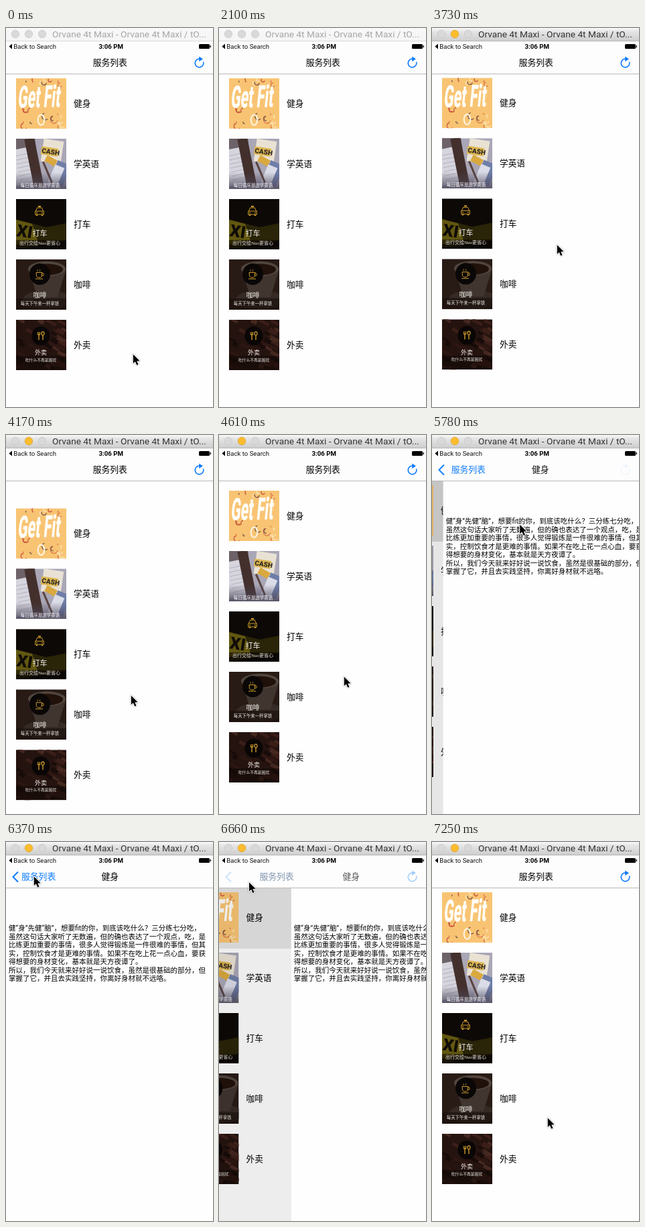
Write an HTML page with a canvas that moves like this. It is 309x565 px and loops after 8000 ms.

```html
<!DOCTYPE html>
<html lang="zh">
<head>
<meta charset="utf-8">
<style>
html, body { margin: 0; width: 100%; height: 100%; overflow: hidden; background: #fff; }
canvas { display: block; width: 309px; height: 565px; }
</style>
</head>
<body>
<canvas id="stage"></canvas>
<script>
const W = 309, H = 565, LOOP = 8000, ROW = 90, PIC = 75;
const BLUE = '#0a7aff', GOLD = '#c99a2c', PAPER = '#fefefe';
const CJK = "Roboto, 'Noto Sans CJK SC', 'Noto Sans CJK', sans-serif";
const SERIF = "'Liberation Serif', 'Noto Sans CJK SC', 'Noto Sans CJK', serif";
const cv = document.getElementById('stage'), c = cv.getContext('2d');
const dpr = window.devicePixelRatio || 1;
cv.width = W * dpr;
cv.height = H * dpr;

// ---- motion ----
const progress = (t, a, b) => Math.min(1, Math.max(0, (t - a) / (b - a)));
const smooth = (t, a, b) => { const u = progress(t, a, b); return u * u * (3 - 2 * u); };
const easeOut = (t, a, b) => 1 - Math.pow(1 - progress(t, a, b), 3);

// Places the pointer rests or turns: time, x, y
const stops = [
  [1050, 189, 486], [1350, 172, 421], [1950, 242, 541], [2850, 224, 488],
  [3730, 186, 323], [4170, 186, 388], [4610, 186, 360], [5200, 140, 142],
  [5640, 140, 142], [6370, 41, 51], [6600, 41, 51], [7250, 172, 411]
];

function pointer(t) {
  let [, x, y] = stops[0];
  for (let i = 1; i < stops.length; i++) {
    const [t0, x0, y0] = stops[i - 1], [t1, x1, y1] = stops[i];
    const u = smooth(t, t0, t1);
    x += (x1 - x0) * u;
    y += (y1 - y0) * u;
  }
  return [x, y];
}

// Dragged down, then springs back; snaps to thirds of a point.
function pullAt(t) {
  if (t < 3500) return 0;
  const drag = 35 * smooth(t, 3730, 4170) - 0.6;
  const spring = 8 * Math.exp((4610 - t) / 262);
  return Math.round(Math.min(drag, spring) * 3) / 3;
}

function sampled(t) {
  if (t < 3137) return Math.min(2850, Math.floor(t / 150) * 150);
  const k = Math.min(28, Math.floor((t - 3137) / 146.79));
  return Math.round(314 + k * 14.679) * 10;
}

// ---- drawing helpers ----
function seeded(seed) {
  return (lo, hi) => {
    seed = (seed * 16807) % 2147483647;
    return lo + (hi - lo) * seed / 2147483647;
  };
}

function rect(x, y, w, h, fill) {
  c.fillStyle = fill;
  c.fillRect(x, y, w, h);
}

function at(x, y, turn, paint) {
  c.save();
  c.translate(x, y);
  c.rotate(turn);
  paint();
  c.restore();
}

// Rectangle around a centre, turned.
const slab = (x, y, w, h, turn, fill) => at(x, y, turn, () => rect(-w / 2, -h / 2, w, h, fill));

function oval(x, y, rx, ry, fill, stroke, lw = 1) {
  c.beginPath();
  c.ellipse(x, y, rx, ry, 0, 0, Math.PI * 2);
  if (fill) { c.fillStyle = fill; c.fill(); }
  if (stroke) { c.strokeStyle = stroke; c.lineWidth = lw; c.stroke(); }
}

function trace(pts) {
  c.beginPath();
  for (let i = 0; i < pts.length; i += 2) c.lineTo(pts[i], pts[i + 1]);
}

function poly(pts, fill) {
  trace(pts);
  c.closePath();
  c.fillStyle = fill;
  c.fill();
}

function line(pts, stroke, lw = 1) {
  trace(pts);
  c.strokeStyle = stroke;
  c.lineWidth = lw;
  c.stroke();
}

function text(s, x, y, font, fill, align = 'left') {
  c.font = font;
  c.fillStyle = fill;
  c.textAlign = align;
  c.fillText(s, x, y);
}

// ---- thumbnails ----
function fitness() {
  const rnd = seeded(41), inks = ['#c8553c', '#d9774a', '#7d5b4e', '#fbe3b4'];
  rect(0, 0, PIC, PIC, '#f8c473');
  for (let i = 0; i < 22; i++) {
    const y = i % 3 ? rnd(45, 73) : rnd(2, 10);
    c.beginPath();
    c.arc(rnd(2, 73), y, rnd(2, 6), rnd(0, 3), rnd(3, 5));
    c.strokeStyle = inks[i % 4];
    c.lineWidth = 1.4;
    c.stroke();
  }
  oval(37.5, 62, 4.8, 7.8, null, '#fff6e4', 2);
  c.save();
  c.transform(0.46, -0.01, -0.1, 1, 2, 44);
  text('Get Fit', 0, 0, '900 46px Roboto, sans-serif', '#fffdf8');
  c.restore();
}

function english() {
  rect(0, 0, PIC, PIC, '#a9a6b6');
  slab(12, 8, 34, 22, -0.1, '#6d6268');
  slab(8, 42, 26, 54, -0.2, '#d6d5de');
  for (let i = 0; i < 7; i++) slab(8 + i, 24 + i * 6, 18, 0.8, -0.2, '#aaa8b4');
  slab(27, 36, 15, 74, -0.2, '#43302d');
  slab(54, 19, 30, 34, 0.15, '#e9e2d4');
  slab(52, 33, 17, 10, 0.5, '#d9a83e');
  slab(50, 19, 25, 12, 0.15, '#dcb653');
  slab(66, 52, 22, 34, 0.4, '#6f7ea8');
  slab(60, 54, 15, 28, 0.4, '#dadce8');
  slab(47, 50, 3, 34, -0.4, '#5b4440');
  at(38, 21, 0.15, () => text('CASH', 0, 0, '900 10px Roboto, sans-serif', '#2c2722'));
  const g = c.createLinearGradient(0, 50, 0, PIC);
  g.addColorStop(0, 'rgba(75,70,88,0)');
  g.addColorStop(1, 'rgba(75,70,88,.85)');
  rect(0, 50, PIC, 25, g);
  text('每日循序渐进学英语', 36, 71.6, '6.5px ' + CJK, '#fff', 'center');
}

function titles(name, size, y, sub, subFont, subY, x = 35.5) {
  text(name, x, y, `500 ${size}px ${CJK}`, '#f3efeb', 'center');
  text(sub, x, subY, subFont, '#efebe6', 'center');
}

function taxi() {
  rect(0, 0, PIC, PIC, '#0d0906');
  poly([0, 30, 45, 42, 75, 36, 75, 62, 0, 75], '#2a2408');
  poly([0, 31, 24, 37, 32, 62, 0, 68], '#625710');
  at(-31, 50, 0.16, () => text('TAXI', 0, 0, '900 25px Roboto, sans-serif', '#100c07'));
  rect(0, 61, PIC, 14, 'rgba(8,5,3,.55)');
  at(35, 18, 0, () => {
    line([-5.5, 0, -3.5, -5, 3.5, -5, 5.5, 0], GOLD, 1);
    c.strokeRect(-6.3, 0, 12.6, 5);
    rect(-2, -8, 4, 2, GOLD);
    for (const s of [-4, 4]) {
      oval(s, 2.5, 0.9, 0.9, GOLD);
      rect(s - 1.2, 5, 2.4, 2, GOLD);
    }
  });
  titles('打车', 11, 55, '出行交给Nuo更省心', '500 7px ' + SERIF, 68);
}

function coffee() {
  rect(0, 0, PIC, PIC, '#281b16');
  oval(46, 60, 36, 14, '#352a24');
  poly([18, 14, 75, 14, 62, 56, 32, 56], '#40352f');
  oval(46, 14, 28, 11, '#51463e');
  oval(46, 15, 24, 8.5, '#21110b');
  rect(0, 58, PIC, 17, 'rgba(24,14,10,.6)');
  oval(35.5, 22, 15.5, 16, '#0a0706');
  at(34.5, 22, 0, () => {
    line([-4.5, -2.5, -4, 3, -2, 5, 2, 5, 4, 3, 4.5, -2.5, -4.5, -2.5], GOLD);
    oval(5.3, 0.5, 1.7, 1.9, null, GOLD, 0.9);
    line([-5.5, 7, 5.5, 7], GOLD);
    for (const s of [-2, 1.5]) line([s, -4, s - 0.8, -5.5, s, -7], GOLD, 0.8);
  });
  titles('咖啡', 10, 56.8, '每天下午来一杯拿铁', '500 6.4px ' + CJK, 68);
}

function takeout() {
  const rnd = seeded(7), tones = ['#3b1e18', '#180c0a', '#452820', '#2e1712'];
  rect(0, 0, PIC, PIC, '#24130f');
  for (let i = 0; i < 40; i++) slab(rnd(0, 75), rnd(0, 75), rnd(8, 20), rnd(3, 7), 0.5, tones[i % 4]);
  rect(0, 54, PIC, 21, 'rgba(18,9,7,.55)');
  oval(37, 24, 13.5, 14, '#0a0605');
  at(37, 24, 0, () => {
    line([-3, -2, -3, 6], GOLD, 1.4);
    for (let i = -1; i < 2; i++) line([i * 1.7 - 3, -6, i * 1.7 - 3, -2], GOLD, 0.9);
    line([-5, -2, -1, -2], GOLD, 1.4);
    oval(3, -3.5, 2, 2.6, null, GOLD, 1.3);
    line([3, -1, 3, 6], GOLD, 1.4);
  });
  titles('外卖', 9, 52.4, '吃什么不再是困扰', '500 5.8px ' + CJK, 62, 37);
}

const rows = [['健身', fitness], ['学英语', english], ['打车', taxi], ['咖啡', coffee], ['外卖', takeout]];
const article = [
  '健“身”先健“脑”，想要fit的你，到底该吃什么？三分练七分吃，',
  '虽然这句话大家听了无数遍，但的确也表达了一个观点，吃，是',
  '比练更加重要的事情，很多人觉得锻炼是一件很难的事情，但其',
  '实，控制饮食才是更难的事情。如果不在吃上花一点心血，要获',
  '得想要的身材变化，基本就是天方夜谭了。',
  '所以，我们今天就来好好说一说饮食，虽然是很基础的部分，但',
  '掌握了它，并且去实践坚持，你离好身材就不远咯。'
];

// ---- screens ----
function list(pull, lit) {
  const shift = Math.round(pull);
  rect(0, 69, W, H - 69, PAPER);
  if (lit) rect(0, 69, W, ROW, `rgba(217,217,217,${lit})`);
  rows.forEach(([name, art], i) => {
    const y = 75 + ROW * i;
    at(15, y + pull, 0, () => {
      c.beginPath();
      c.rect(0, 0, PIC, PIC);
      c.clip();
      art();
    });
    text(name, 101, y + shift + 42.4, '12.7px ' + CJK, '#000');
    if (shift === 1) rect(101, y + 84, W - 101, 1, '#dedede');
  });
}

function detail() {
  rect(0, 69, W, H - 69, PAPER);
  article.forEach((s, i) => text(s, 4, 132.4 + i * 12.5, '10.5px ' + CJK, '#000'));
}

function navBar(p, pressed) {
  const title = '500 12.8px ' + CJK;
  rect(0, 35, W, 33, '#fdfdfd');
  rect(0, 68, W, 1, '#b9b9b9');
  c.globalAlpha = 1 - p;
  text('服务列表', 155.3 - 106 * p, 56.1, title, '#000', 'center');
  c.beginPath();
  c.arc(288.6, 52.3, 6.3, -0.3, Math.PI * 1.55);
  c.strokeStyle = BLUE;
  c.lineWidth = 1.6;
  c.stroke();
  poly([288.2, 42.5, 294, 46.3, 288.2, 50], BLUE);
  c.globalAlpha = p * (pressed ? 0.3 : 1);
  line([18, 44.5, 10.5, 52, 18, 59.5], BLUE, 2);
  text('服务列表', 23 + 106 * (1 - p), 56.1, '12.8px ' + CJK, BLUE);
  c.globalAlpha = p;
  text('健身', 155.3 + 120 * (1 - p), 56.1, title, '#000', 'center');
  c.globalAlpha = 1;
}

function statusBar() {
  rect(0, 20, W, 15, '#fdfdfd');
  poly([4.5, 27.5, 9, 23.5, 9, 31.5], '#000');
  text('Back to Search', 11.3, 30.9, '9.6px Roboto, sans-serif', '#111');
  text('3:06 PM', 156.7, 31, 'bold 9.7px Roboto, sans-serif', '#000', 'center');
  c.beginPath();
  c.roundRect(288, 24, 16, 7, 1.5);
  c.fillStyle = '#000';
  c.fill();
  rect(304.7, 26, 1.3, 3, '#000');
}

function windowBar(active) {
  const g = c.createLinearGradient(0, 0, 0, 19);
  g.addColorStop(0, '#fafafa');
  g.addColorStop(0.25, active ? '#e6e6e6' : '#f7f7f7');
  g.addColorStop(1, active ? '#cecece' : '#f5f5f5');
  rect(0, 0, W, 19, g);
  rect(0, 19, W, 1, active ? '#b8b8b8' : '#dadada');
  for (let i = 0; i < 3; i++) {
    const gold = active && i === 1;
    oval(14 + i * 20, 9, 5.7, 5.7, gold ? '#fdbd2e' : '#d9d9d9', gold ? '#dfa023' : '#c8c8c8', 0.8);
  }
  text('Orvane 4t Maxi - Orvane 4t Maxi / tO...', 69, 14, '13.7px Roboto, sans-serif',
    active ? '#333' : '#a6a6a6');
}

function cursor([x, y]) {
  at(x, y, 0, () => {
    trace([0.8, 0.5, 0.8, 14, 3.9, 11.2, 6.2, 16.4, 8.5, 15.4, 6.3, 10.4, 10.6, 10.2]);
    c.closePath();
    c.lineJoin = 'round';
    c.shadowColor = 'rgba(0,0,0,.4)';
    c.shadowBlur = 2 * dpr;
    c.strokeStyle = '#fff';
    c.lineWidth = 2;
    c.stroke();
    c.shadowColor = 'transparent';
    c.fillStyle = '#000';
    c.fill();
  });
}

function draw(now) {
  const t = sampled(now % LOOP);
  const p = easeOut(t, 5500, 5950) - easeOut(t, 6600, 7050);
  const lit = t < 5490 ? 0 : t < 6600 ? 1 : p;
  c.setTransform(dpr, 0, 0, dpr, 0, 0);
  if (p < 1) {
    at(-93 * p, 0, 0, () => list(pullAt(t), lit));
    rect(0, 69, W, H - 69, `rgba(0,0,0,${0.1 * p})`);
  }
  if (p > 0) at(W * (1 - p), 0, 0, detail);
  navBar(p, t >= 6520);
  statusBar();
  windowBar(t >= 3290);
  if (t < 2100 || t >= 2400) cursor(pointer(t));
}

const start = performance.now();
function tick() {
  draw(performance.now() - start);
  requestAnimationFrame(tick);
}
tick();
</script>
</body>
</html>
```
